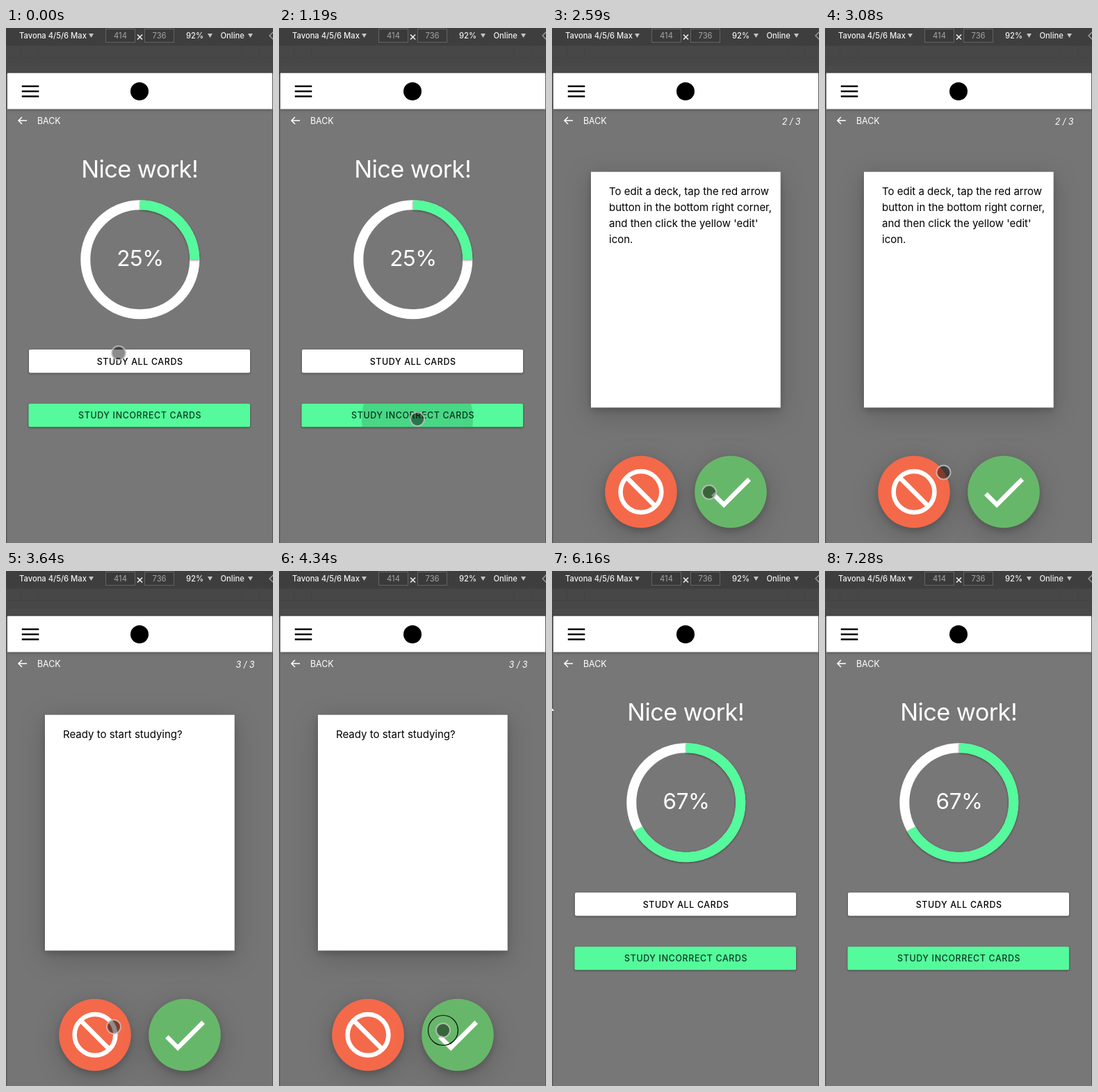
Animation, 384 px wide and 740 px high, one loop 7350 ms. Source, as an HTML page:

```html
<!DOCTYPE html>
<html lang="en">
<head>
<meta charset="utf-8">
<title>Flash card study session</title>
<style>
  html, body { margin: 0; width: 100%; height: 100%; overflow: hidden; background: #757575; }
  svg { display: block; width: 100vw; height: 100vh; font-family: Inter, Roboto, sans-serif; }
  .tools { font-size: 11.2px; font-weight: 500; fill: #f1f1f1; }
  .tools .size { fill: #a5a5a5; font-weight: 400; text-anchor: middle; }
  .light { fill: #fff; }
  .mid { text-anchor: middle; }
  .label { font-size: 12.4px; font-weight: 500; letter-spacing: .65px; text-anchor: middle; }
  .title { font-size: 34.3px; letter-spacing: -.55px; }
  .percent { font-size: 31.5px; letter-spacing: -.5px; }
  .card-text { font-size: 15px; }
  .counter { font-size: 12.5px; font-style: italic; text-anchor: end; }
  .header { filter: drop-shadow(0 1px 2px rgba(0,0,0,.35)); }
  .button { filter: drop-shadow(0 1px 1.5px rgba(0,0,0,.45)); }
  .raised { filter: drop-shadow(0 4px 5px rgba(0,0,0,.18)) drop-shadow(0 9px 18px rgba(0,0,0,.19)); }
</style>
</head>
<body>
<svg viewBox="0 0 384 740">
  <defs>
    <clipPath id="buttonClip"><rect x="33" y="540" width="318" height="33" rx="2"/></clipPath>
    <path id="caret" d="M0 8h7l-3.5 6z" fill="#c4c4c4"/>
  </defs>

  <rect id="page" width="384" height="740"/>

  <!-- Browser device toolbar -->
  <rect width="384" height="66" fill="#474747"/>
  <rect width="384" height="25" fill="#3e3e3e"/>
  <path d="M0 25.5H384M0 42.5H384M21.5 26V42M46.5 26V42M338.5 26V42M363.5 26V42" stroke="#434343" fill="none"/>
  <path d="M2 65V60q0-6 7-6H376q7 0 7 6v5z" fill="#4a4a4a"/>
  <g class="tools">
    <text x="19" y="15">Tavona 4/5/6 Max</text>
    <use href="#caret" x="119"/>
    <g fill="#3a3a3a" stroke="#636363">
      <rect x="143.5" y="1.5" width="42" height="19"/>
      <rect x="199.5" y="1.5" width="42" height="19"/>
    </g>
    <text class="size" x="164.5" y="15">414</text>
    <text class="size" x="220.5" y="15">736</text>
    <path d="M189 9.5l7 7m0-7l-7 7" stroke="#eee" stroke-width="1.6"/>
    <text x="259" y="15">92%</text>
    <use href="#caret" x="290"/>
    <text x="308.5" y="15">Online</text>
    <use href="#caret" x="348"/>
    <path d="M385 5l-6 6 6 6" fill="none" stroke="#999" stroke-width="1.5"/>
  </g>

  <!-- App header -->
  <rect class="header" x="2" y="64.7" width="381" height="51.8" fill="#fff"/>
  <path d="M22.8 83.7h24.5M22.8 91h24.5M22.8 98.3h24.5" stroke="#000" stroke-width="2.6"/>
  <circle cx="192" cy="91" r="13"/>
  <path d="M0 66H1.5V740H0zM383 66h1V740h-1z" fill="#585858"/>
  <path d="M30 133H18.5M23 128l-5 5 5 5" fill="none" stroke="#fff" stroke-width="1.5"/>
  <text class="light" x="45" y="137.5" font-size="12.4">BACK</text>

  <g id="result">
    <text class="light mid title" x="192.2" y="215">Nice work!</text>
    <g fill="none" stroke-width="14">
      <circle cx="192.8" cy="332.8" r="78.5" stroke="#fff"/>
      <g class="button">
        <circle id="arc" cx="192.8" cy="332.8" r="78.5" stroke="#54fa9b" pathLength="100"
          transform="rotate(-90 192.8 332.8)"/>
      </g>
    </g>
    <text id="percent" class="light mid percent" x="193" y="342"></text>
    <rect class="button" x="33" y="462" width="318" height="33.5" rx="2" fill="#fff"/>
    <text class="label" x="192.7" y="483.5">STUDY ALL CARDS</text>
    <rect class="button" x="32.5" y="539.7" width="318.5" height="33.5" rx="2" fill="#54fa9b"/>
    <text class="label" x="192.7" y="561" fill="#0d3a20">STUDY INCORRECT CARDS</text>
    <circle id="ripple" cx="199" cy="562" fill="#000" opacity=".14" clip-path="url(#buttonClip)"/>
  </g>

  <g id="study">
    <text id="counter" class="light counter" x="357.5" y="138.5"></text>
    <rect class="raised" x="56" y="206.7" width="272.7" height="338.7" fill="#fff"/>
    <g id="lines" class="card-text"></g>
    <g id="party" transform="translate(224 226)">
      <path d="M1 16L5 5l7 7z" fill="#e9b44c"/>
      <path d="M3 11l4 3M5 6l5 6" stroke="#a8722c"/>
      <path d="M8 7q3-2 1-6M11 9q2-3 5-2" fill="none" stroke="#d9534f" stroke-width="1.3"/>
      <path d="M3 2h2v2H3zM13 2h2v2h-2zM14 12h2v2h-2z" fill="#4f8fc9"/>
      <path d="M11 4h1.5v1.5H11zM6 0h1.5v1.5H6z" fill="#e5a33a"/>
    </g>
    <circle class="raised" cx="128" cy="666.5" r="51.8" fill="#f4694a"/>
    <g fill="none" stroke="#fff" stroke-width="6.5">
      <circle cx="128" cy="666.5" r="29.4"/>
      <path d="M107.4 645.9l41.2 41.2"/>
    </g>
    <circle class="raised" cx="257" cy="666.5" r="51.8" fill="#67b76a"/>
    <path transform="translate(218 628) scale(3.24)" fill="#fff"
      d="M9 16.17L4.83 12 3.41 13.41 9 19 21 7 19.59 5.59z"/>
  </g>

  <g id="cursor">
    <circle r="10" fill="#000" fill-opacity=".45" stroke="#c4c4c4" stroke-opacity=".8" stroke-width="2"/>
    <circle id="press" r="21.5" fill="none" stroke="#111" stroke-width="1.2"/>
  </g>
  <path id="arrow" d="M0 197l3 4H0z" fill="#fff"/>
</svg>

<script>
const LOOP = 7350, STEP = 70;
const $ = id => document.getElementById(id);

const cards = [
  ['Welcome to Tilvon!'],
  ['To edit a deck, tap the red arrow', 'button in the bottom right corner,', "and then click the yellow 'edit'", 'icon.'],
  ['Ready to start studying?']
];

// Each screen lasts until its end time.
const screens = [
  { end: 1260, score: 25 },
  { end: 2450, card: 0 },
  { end: 3500, card: 1 },
  { end: 4480, card: 2 },
  { end: LOOP, score: 67 }
];

// Pointer path: time, x, y
const path = [
  [0, 162, 467], [280, 196, 546], [420, 196, 546], [770, 199, 562], [1610, 199, 562],
  [2030, 220.5, 594.5], [2240, 226, 667], [2590, 226, 667], [3080, 170.5, 638.5], [3290, 155, 655],
  [3640, 155, 655], [4200, 236, 660], [5390, 236, 660], [6090, -14, 215], [LOOP, -14, 215]
];
const presses = [[980, 1120], [2240, 2450], [3360, 3500], [4270, 4480]];

const within = (t, [from, to]) => t >= from && t < to;
const show = (id, on) => $(id).setAttribute('display', on ? 'inline' : 'none');

function pointerAt(t) {
  const i = path.findIndex(point => point[0] > t);
  const [t0, x0, y0] = path[i - 1], [t1, x1, y1] = path[i];
  const k = (t - t0) / (t1 - t0);
  return [x0 + (x1 - x0) * k, y0 + (y1 - y0) * k];
}

let current;
function showScreen(screen) {
  if (screen === current) return;
  current = screen;
  const isResult = 'score' in screen;
  show('result', isResult);
  show('study', !isResult);
  $('page').setAttribute('fill', isResult ? '#777' : '#757575');
  if (isResult) {
    $('arc').setAttribute('stroke-dasharray', `${screen.score} 100`);
    $('percent').textContent = `${screen.score}%`;
  } else {
    $('counter').textContent = `${screen.card + 1} / ${cards.length}`;
    $('lines').innerHTML = cards[screen.card]
      .map((line, i) => `<text x="82" y="${239.5 + 23 * i}">${line}</text>`).join('');
    show('party', screen.card === 0);
  }
}

function draw(now) {
  const t = Math.floor(now % LOOP / STEP) * STEP;
  showScreen(screens.find(screen => t < screen.end));
  $('cursor').setAttribute('transform', `translate(${pointerAt(t)})`);
  show('press', presses.some(press => within(t, press)));
  show('arrow', within(t, [6090, 6230]));
  $('ripple').setAttribute('r', within(t, [1050, 1260]) ? (t - 1050) / 140 * 80 : 0);
}

const start = performance.now();
function tick() {
  draw(performance.now() - start);
  requestAnimationFrame(tick);
}
tick();
</script>
</body>
</html>
```
